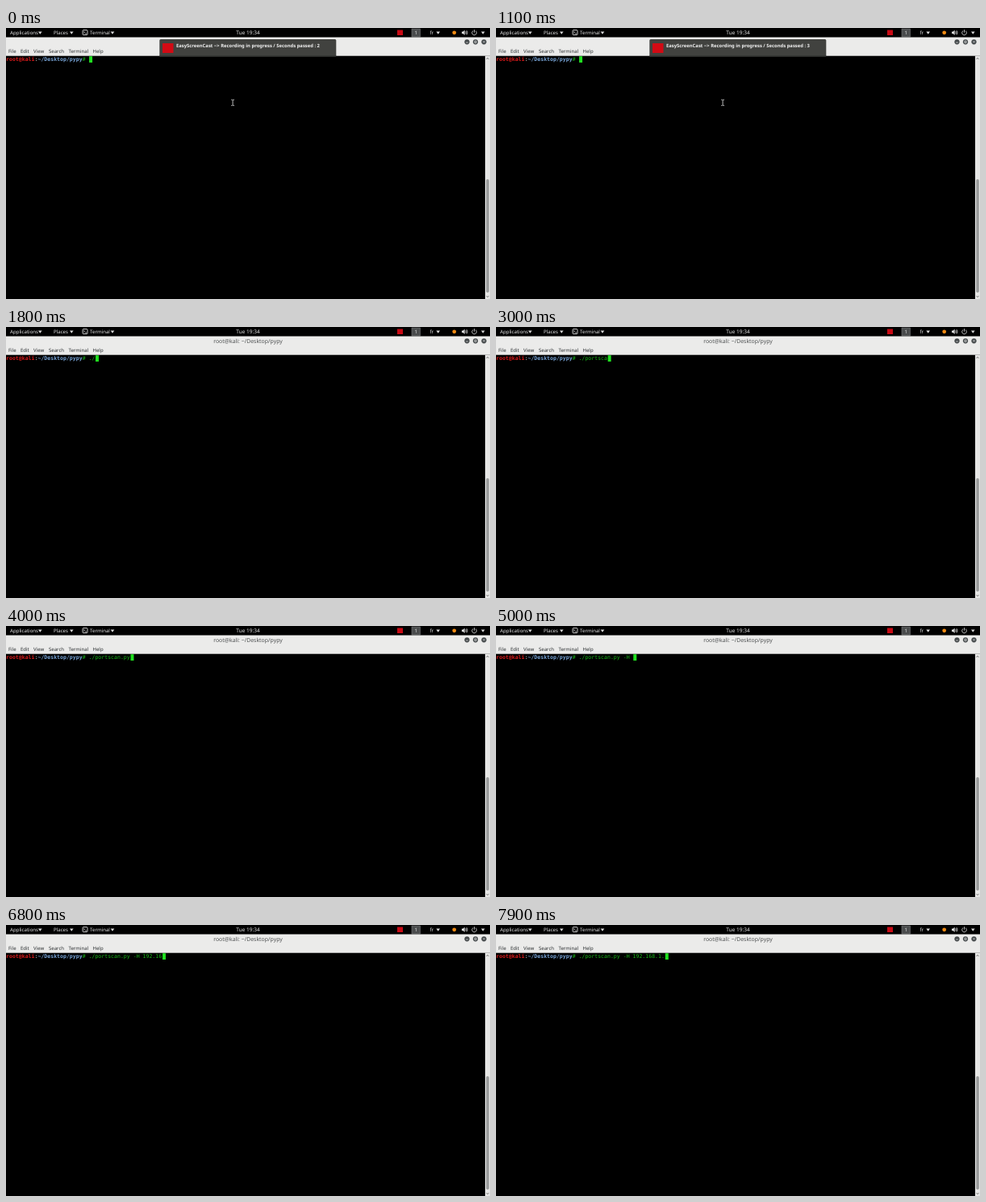
These frames come from a looping animation (600 px wide and 337 px high, 8000 ms). An HTML page:

```html
<!DOCTYPE html>
<html lang="en">
<head>
<meta charset="utf-8">
<title>Terminal typing</title>
<style>
  html, body { margin: 0; width: 100%; height: 100%; overflow: hidden; background: #000; }
  svg { display: block; width: 600px; height: 337px; }
  text { font: 6.1px "Noto Sans", sans-serif; white-space: pre; text-rendering: geometricPrecision; }
  .bar text { fill: #e4e4e4; }
  .bar .clock { font-size: 6.5px; text-anchor: middle; }
  .menu text { fill: #2b2f31; font-size: 6px; }
  .menu .title { fill: #505354; font-size: 6.9px; text-anchor: middle; }
  .shell text { font: 6.566px "DejaVu Sans Mono", monospace; fill: #18b818; }
  .shell .user { fill: #d81a1a; font-weight: bold; }
  .shell .colon { fill: #ddd; }
  .shell .path { fill: #78a5d8; font-weight: bold; }
  .notice text { fill: #f2f2f2; font-size: 5.87px; font-weight: bold; }
</style>
</head>
<body>
<svg viewBox="0 0 600 337">
  <defs>
    <path id="down" d="M-2.3-1.5h4.6L0 1.8z"/>
    <circle id="button" r="3.1" fill="#454a4c"/>
  </defs>
  <rect width="600" height="337"/>

  <g class="bar">
    <text x="5" y="8.1">Applications</text>
    <text x="59" y="8.1">Places</text>
    <text x="104" y="8.1">Terminal</text>
    <text class="clock" x="300" y="8.2">Tue 19:34</text>
    <rect x="503" y="1" width="10.5" height="10" fill="#4a4c4d" stroke="#77797a" stroke-width=".6"/>
    <text x="506.5" y="8.2">1</text>
    <text x="525.5" y="8.1">fr</text>
    <g fill="#dcdcdc">
      <use href="#down" x="42.3" y="6"/>
      <use href="#down" x="81.3" y="6"/>
      <use href="#down" x="132" y="6"/>
      <use href="#down" x="535.7" y="6"/>
      <use href="#down" x="591.3" y="6"/>
      <path d="M565 4.5h1.6l2-2v6.6l-2-2H565z"/>
    </g>
    <g fill="none" stroke="#dcdcdc" stroke-width=".9">
      <rect x="95" y="2.6" width="6" height="6" rx="1"/>
      <path d="M96.3 4.4l1.2 1-1.2 1M98.3 7h1.6M569.7 4.3q1 1.5 0 3M571 3.2q1.8 2.6 0 5.2"/>
      <path d="M579 3.6a2.8 2.8 0 1 0 3 0M580.5 2.2v3.4"/>
    </g>
    <rect x="485" y="2.5" width="7" height="6.5" fill="#c80a14"/>
    <circle cx="555.7" cy="5.8" r="2.4" fill="#f08a12"/>
  </g>

  <g class="menu">
    <rect y="11.5" width="600" height="23.2" fill="#ebebea"/>
    <text class="title" x="300" y="19.8">root@kali: ~/Desktop/pypy</text>
    <text x="3" y="31.2">File</text>
    <text x="18" y="31.2">Edit</text>
    <text x="34" y="31.2">View</text>
    <text x="53" y="31.2">Search</text>
    <text x="77.5" y="31.2">Terminal</text>
    <text x="107.5" y="31.2">Help</text>
    <use href="#button" x="571.5" y="17.3"/>
    <use href="#button" x="582" y="17.3"/>
    <use href="#button" x="592.5" y="17.3"/>
    <path d="M570.2 18h2.6M580.9 16.2h2.2v2.2h-2.2zM591.4 16.2l2.2 2.2M593.6 16.2l-2.2 2.2" fill="none" stroke="#eee" stroke-width=".7"/>
  </g>

  <rect x="594" y="34.7" width="6" height="302.3" fill="#e6e6e5"/>
  <rect x="595.2" y="188" width="3.6" height="141" rx="1.8" fill="#999b9b"/>
  <path d="M595.5 39l1.5-1.8 1.5 1.8M595.5 333l1.5 1.8 1.5-1.8" fill="none" stroke="#555" stroke-width=".7"/>

  <g class="shell">
    <text x="0" y="41.2"><tspan class="user">root@kali</tspan><tspan class="colon">:</tspan><tspan class="path">~/Desktop/pypy</tspan># <tspan id="typed"></tspan></text>
    <rect id="cursor" y="35.2" width="4" height="7.8" fill="#20e020"/>
  </g>

  <path id="pointer" d="M279.2 89.2h1.2l.7.6.7-.6h1.2M281.1 89.8v6M279.2 96.4h1.2l.7-.6.7.6h1.2" fill="none" stroke="#ccc" stroke-width=".9"/>

  <g id="notice" class="notice">
    <rect x="190.3" y="14" width="219" height="22" rx="1.5" fill="#41423f"/>
    <rect x="190.3" y="34.5" width="219" height="1.5" fill="#2b2c2a"/>
    <rect x="194" y="19" width="13.5" height="12" fill="#d20a14"/>
    <text x="211" y="23.8">EasyScreenCast −&gt; Recording in progress / Seconds passed : <tspan id="seconds"></tspan></text>
  </g>
</svg>
<script>
  const LOOP = 8000, PROMPT_LENGTH = 26, CHAR_WIDTH = 3.953;
  const COMMAND = "./portscan.py -H 192.168.1.";
  // The moment each character of the command appears, in ms.
  const KEY_TIMES = [
    1200, 1700, 2000, 2300, 2300, 2500, 2800, 2900, 3000,
    3200, 3600, 3900, 4000, 4100, 4400, 4800, 5000,
    5600, 5900, 6100, 6400, 6500, 6800, 7200, 7600, 7700, 7900
  ];
  const BLINKS = [[600, 1100], [5500, 5600]];

  const [typed, cursor, pointer, notice, seconds] =
    ["typed", "cursor", "pointer", "notice", "seconds"].map(id => document.getElementById(id));
  const show = (element, visible) =>
    element.setAttribute("visibility", visible ? "visible" : "hidden");

  function draw(now) {
    const t = now % LOOP;
    const count = KEY_TIMES.filter(time => time <= t).length;
    typed.textContent = COMMAND.slice(0, count);
    cursor.setAttribute("x", (PROMPT_LENGTH + count) * CHAR_WIDTH + 0.3);
    show(cursor, !BLINKS.some(([off, on]) => t >= off && t < on));
    show(pointer, t < 1200);
    show(notice, t < 1800);
    seconds.textContent = t < 800 ? 2 : 3;
  }

  const start = performance.now();
  function frame() {
    draw(performance.now() - start);
    requestAnimationFrame(frame);
  }
  frame();
</script>
</body>
</html>
```
